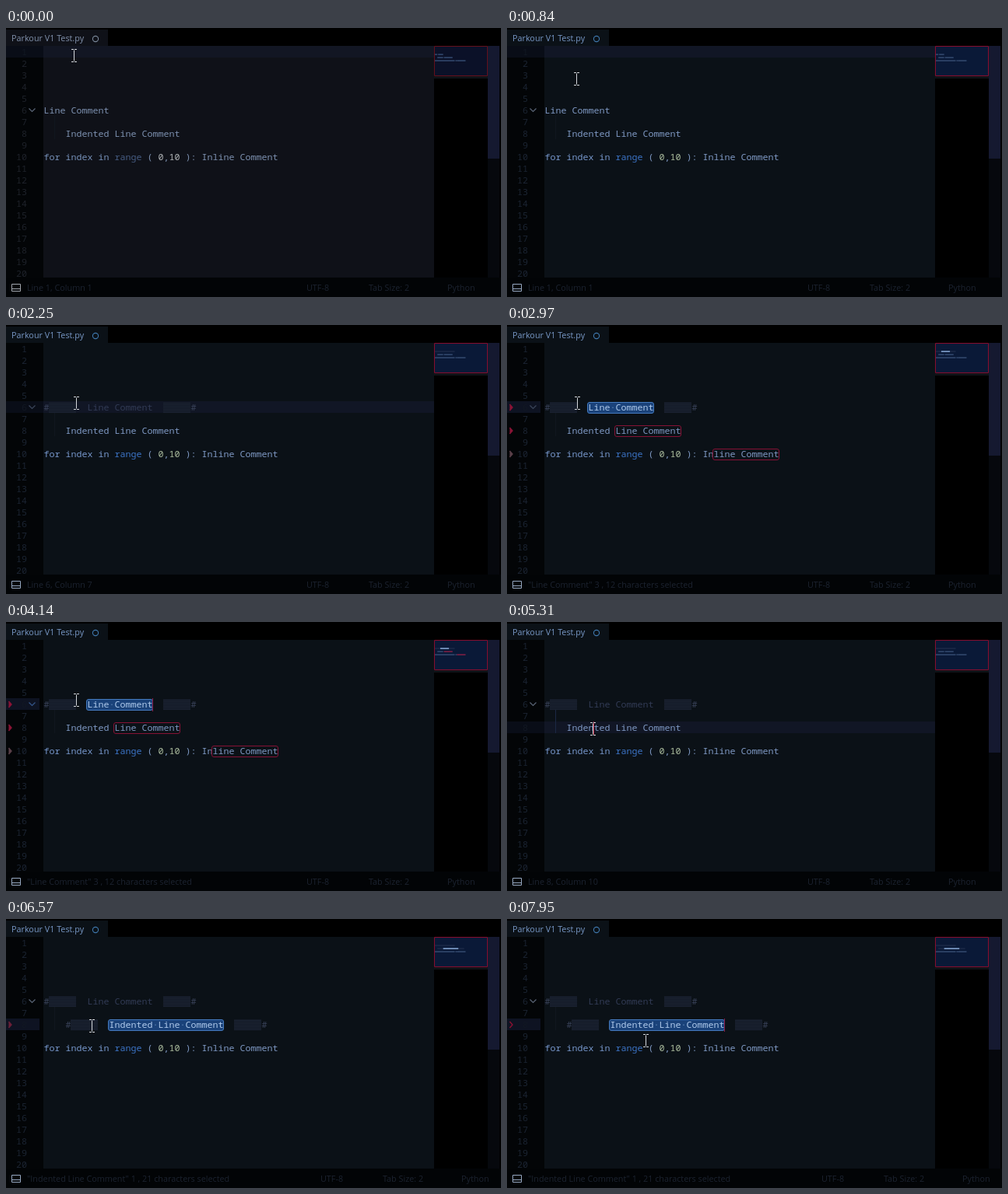
Animation of 636 by 346 pixels, one loop 8 s. Source, as an HTML page with a canvas:

```html
<!DOCTYPE html>
<html lang="en">
<head>
<meta charset="utf-8">
<title>Comment toggling</title>
<style>
html, body { margin: 0; width: 100%; height: 100%; overflow: hidden; background: #000; }
canvas { display: block; }
</style>
</head>
<body>
<canvas id="stage" width="636" height="346"></canvas>
<script>
const c = document.getElementById('stage').getContext('2d');
const LOOP = 8000, CHAR = 7, LEFT = 48, TOP = 23, ROW = 15;
const MONO = '500 11.66px "Noto Sans Mono", "DejaVu Sans Mono", monospace';
const UI = '10.8px "Open Sans", "Noto Sans", sans-serif';

const within = (t, a, b) => t >= a && t < b;
const clamp = v => Math.max(0, Math.min(1, v));
const ease = k => k * k * (3 - 2 * k);
const rowY = n => TOP + (n - 1) * ROW;
const colX = n => LEFT + n * CHAR;

// Blend two #rrggbb colours.
function mix(a, b, k) {
  const part = (s, i) => parseInt(s.slice(i, i + 2), 16);
  return 'rgb(' + [1, 3, 5].map(i => Math.round(part(a, i) + (part(b, i) - part(a, i)) * k)) + ')';
}
function rect(x, y, w, h, fill) {
  c.fillStyle = fill;
  c.fillRect(x, y, w, h);
}
function text(s, x, y, fill, font = MONO) {
  c.font = font;
  c.fillStyle = fill;
  c.fillText(s, x, y);
}
function path(points, stroke, width = 1) {
  c.beginPath();
  points.forEach(([x, y]) => c.lineTo(x, y));
  c.strokeStyle = stroke;
  c.lineWidth = width;
  c.stroke();
}
function box(x, y, w, h, stroke, fill, radius = 0) {
  c.beginPath();
  c.roundRect(x, y, w, h, radius);
  if (fill) { c.fillStyle = fill; c.fill(); }
  c.strokeStyle = stroke;
  c.lineWidth = 1;
  c.stroke();
}
const code = (s, row, col, fill) => text(s, colX(col) + .5, rowY(row) + 12, fill);
const frameWord = (row, col, len, stroke, fill) =>
  box(colX(col) - .5, rowY(row) + 1.5, len * CHAR + 1, 14, stroke, fill, 2.5);

function mouse(t) {
  const a = ease(clamp((t - 420) / 780));
  const b = ease(clamp((t - 4470) / 390));
  const d = ease(clamp((t - 7530) / 420));
  const dip = -30 * Math.sin(Math.PI * clamp((t - 420) / 450));
  return [87 + 3 * a + 20 * b + 68 * d, 35 + 65 * a + 37 * b + 19 * d + dip];
}

function shade(row, col, len = 5) {
  rect(colX(col), rowY(row) + 1, len * CHAR, 14, '#121824');
  for (let y = 2; y < 15; y += 2) rect(colX(col), rowY(row) + y, len * CHAR, 1, '#1c2434');
}

// A comment line: hash, shading, words, shading, hash.
function comment(s, row, col, selected) {
  const start = col + 8, end = start + s.length;
  code('#', row, col, '#3a435a');
  shade(row, col + 1);
  shade(row, end + 2);
  code('#', row, end + 7, '#3a435a');
  if (selected) {
    frameWord(row, start, s.length, '#4479bd', '#1a427a');
    code(s.replace(/\S/g, ' ').replace(/ /g, (_, i) => s[i] === ' ' ? '·' : ' '), row, start, '#6288b8');
  }
  code(s, row, start, selected ? '#afcaec' : '#323b55');
}

function marker(row, stroke, solid) {
  const y = rowY(row) + 8;
  path([[3.5, y - 4], [7, y], [3.5, y + 4]], stroke, 1.4);
  if (solid) { c.fillStyle = stroke; c.fill(); }
}

function minimap(s, warm) {
  rect(550, TOP, 69, 298, '#000000');
  rect(550, 62, 69, 3, '#101318');
  rect(550.5, 23.5, 68, 38, warm('#0b1128', '#0a1937'));
  const mark = (row, col, len, fill) => rect(550.5 + col * .93, 21.3 + row * 2, len * .93, 1.5, fill);
  const plain = '#344a70', dim = '#1c2a48', bright = '#86a8d6', red = '#842045';
  if (s.commented6) {
    mark(6, 0, 28, dim);
    if (s.select6) mark(6, 8, 12, bright);
  } else { mark(6, 0, 4, plain); mark(6, 5, 7, plain); }
  if (s.commented8) {
    mark(8, 4, 37, dim);
    if (s.select8) mark(8, 12, 21, bright);
  } else {
    mark(8, 4, 8, plain);
    mark(8, 13, 12, s.redMap ? red : plain);
  }
  mark(10, 0, 28, plain);
  mark(10, 29, 2, plain);
  mark(10, 31, 12, s.redMap ? red : plain);
  box(550.5, 23.5, 68, 38, warm('#65101c', '#870d2e'));
  rect(619, TOP, 15, 298, '#06080d');
  rect(619, TOP, 15, 145, '#151930');
}

function state(t) {
  const s = {
    line: t < 1230 ? 1 : t < 5070 ? 6 : 8,
    commented6: t >= 2130,
    select6: within(t, 2430, 5070),
    commented8: t >= 6000,
    select8: t >= 6180,
    redMap: within(t, 3330, 5070)
  };
  s.status = t < 1800 ? 'Line 1, Column 1'
    : t < 2430 ? 'Line 6, Column 7'
    : t < 5100 ? '"Line Comment" 3 , 12 characters selected'
    : t < 6180 ? 'Line 8, Column 10'
    : '"Indented Line Comment" 1 , 21 characters selected';
  // Caret column, or -1 while it is blinked off.
  const blink = [[1230, 2130, 6], [2430, 2700, 20], [3300, 3585, 20], [4140, 4500, 20],
    [5070, 6000, 9], [6180, 6540, 33], [6750, 7035, 33], [7530, LOOP, 33]];
  const on = blink.find(([a, b]) => within(t, a, b));
  s.caret = on ? on[2] : -1;
  return s;
}

function draw(t) {
  const s = state(t), k = clamp((t - 10) / 260), warm = (a, b) => mix(a, b, k);
  const selecting = s.select6 || s.select8;
  const page = warm('#0f1118', '#0b1117');
  rect(0, 0, 636, 346, '#000000');
  rect(0, 2, 131, 21, page);
  rect(0, TOP, LEFT, 298, '#030507');
  rect(LEFT, TOP, 502, 298, page);
  rect(0, 321, 636, 25, '#020406');

  text('Parkour V1 Test.py', 7, 17, warm('#8292ac', '#7898c6'), UI);
  c.beginPath();
  c.arc(115, 14, 3.6, 0, 7);
  c.strokeStyle = warm('#7a8799', '#3f78ad');
  c.lineWidth = 1.1;
  c.stroke();

  const y = rowY(s.line);
  rect(0, y, selecting ? 43 : LEFT, ROW, selecting ? '#0e1322' : '#090d17');
  if (!selecting) rect(LEFT, y, 502, ROW, warm('#121623', '#111625'));

  c.textAlign = 'right';
  for (let n = 1; n <= 20; n++)
    text(n, 27, rowY(n) + 12, n === s.line ? '#121823' : warm('#1e222a', '#1b2432'));
  c.textAlign = 'left';

  const guide = s.line === 8 && !s.select8;
  rect(62, rowY(7), 1, 30, guide ? '#1b2844' : '#10161f');

  const fold = s.redMap ? '#34568a' : t >= 1230 && t < 5070 ? '#3b465b' : '#5a6576';
  path([[29.5, 103.5], [33.5, 107.5], [37.5, 103.5]], fold, 1.2);

  const word = warm('#7d91b0', '#7f99c4');
  if (s.commented6) comment('Line Comment', 6, 0, s.select6);
  else code('Line Comment', 6, 0, word);
  if (s.commented8) comment('Indented Line Comment', 8, 4, s.select8);
  else code('Indented Line Comment', 8, 4, word);
  code('for index in', 10, 0, warm('#7690b8', '#7696ca'));
  code('range', 10, 13, warm('#465c82', '#3c74c6'));
  code('(', 10, 19, word);
  code('0', 10, 21, warm('#b2b6b8', '#adbe9f'));
  code(',', 10, 22, word);
  code('10', 10, 23, warm('#b2b6b8', '#adbe9f'));
  code('): Inline Comment', 10, 26, word);

  if (s.select6) {
    frameWord(8, 13, 12, '#861235');
    frameWord(10, 31, 12, '#861235');
    marker(6, '#8a1436', true);
    marker(8, '#8a1436', true);
    marker(10, '#5a4049', true);
  }
  if (s.select8) marker(8, s.caret < 0 ? '#6a2038' : '#8a1232', s.caret < 0);
  if (s.caret >= 0) rect(colX(s.caret), y, 1, ROW + 2, selecting ? '#8c1c48' : '#b01e3c');
  if (within(t, 1500, 1800)) box(82.5, 94.5, 13, 14, '#4d1022', null, 2);

  minimap(s, warm);

  const label = '#1c2330';
  const shift = s.select8 ? 18 : 0;
  const icon = warm('#a3a8af', '#98aac4');
  box(7.5, 329.5, 11, 9, icon);
  rect(8, 335, 10, 1, icon);
  text(s.status, 27, 338, label, UI);
  text('UTF-8', 386 + shift, 338, label, UI);
  text('Tab Size: 2', 466 + shift, 338, label, UI);
  text('Python', 567 + shift, 338, label, UI);

  const [mx, my] = mouse(t).map(v => Math.round(v) + .5);
  path([[mx, my - 7], [mx, my + 7]], '#d5d8dc');
  for (const end of [-8, 8]) {
    path([[mx - 3.5, my + end], [mx - .5, my + end]], '#d5d8dc');
    path([[mx + .5, my + end], [mx + 3.5, my + end]], '#d5d8dc');
  }
}

const begin = performance.now();
function tick() {
  draw((performance.now() - begin) % LOOP);
  requestAnimationFrame(tick);
}
tick();
</script>
</body>
</html>
```
